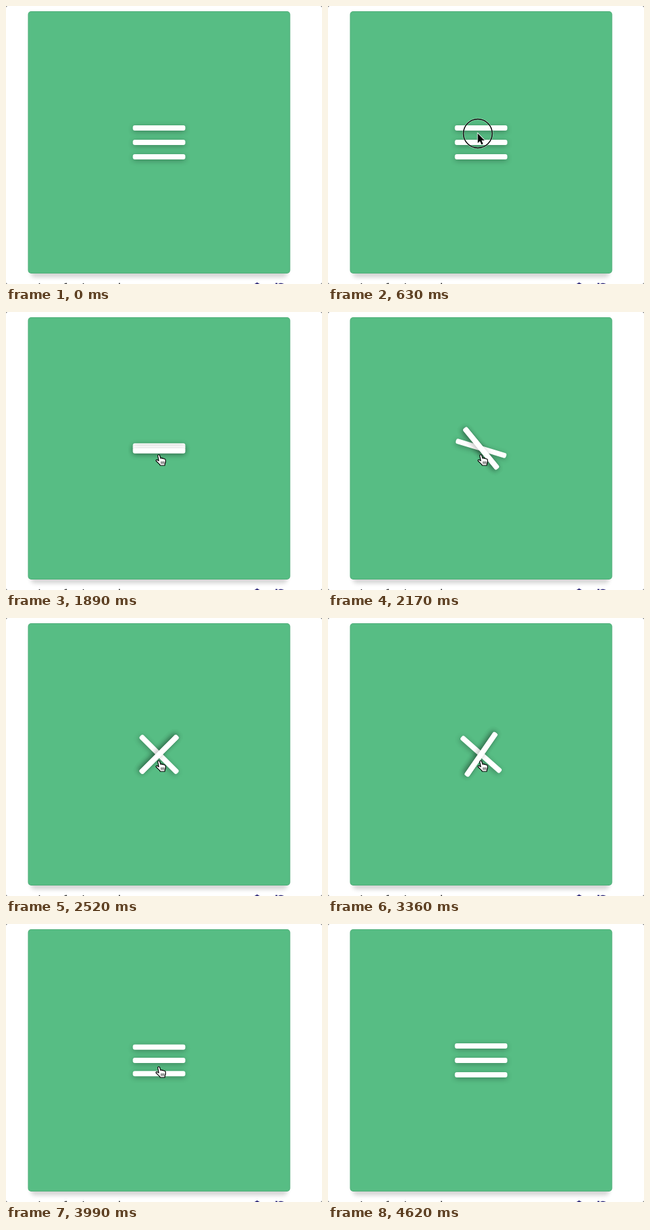
Animation, 482 px wide and 424 px high, one loop 5390 ms. Source, as an HTML page:

```html
<!DOCTYPE html>
<html lang="en">
<head>
<meta charset="utf-8">
<title>Menu icon</title>
<style>
  html, body { margin: 0; width: 100%; height: 100%; overflow: hidden; background: #fff; }
  svg { display: block; width: 100%; height: 100%; }
</style>
</head>
<body>
<svg viewBox="0 0 482 424">
  <defs>
    <filter id="soft" filterUnits="userSpaceOnUse" x="-70" y="-40" width="140" height="80">
      <feGaussianBlur stdDeviation="4"/>
    </filter>
    <filter id="lift" filterUnits="userSpaceOnUse" x="0" y="0" width="482" height="440">
      <feGaussianBlur stdDeviation="3"/>
    </filter>
    <g id="bar">
      <rect x="-40" y="-2" width="80" height="8" rx="3" opacity=".3" filter="url(#soft)"/>
      <rect x="-40" y="-4" width="80" height="8" rx="3" fill="#fff"/>
    </g>
  </defs>

  <rect width="482" height="424" fill="#fff"/>
  <path d="M0 0h2L0 2zM482 0v2l-2-2zM0 424v-2l2 2zM482 424h-2l2-2z" fill="#777"/>
  <g fill="#444">
    <path d="M50 423h2v1h-2zM89 423.5q1-1.5 4-1v1.500h-4zM117 423h2v1h-2zM172 422.500h2v1.500h-2z"/>
    <path d="M379 424l4-2.500 4 2.500zM411 422.500h3v1.500h-3zM415 424q4-3 9 0z" fill="#35307e"/>
  </g>

  <rect x="38" y="20" width="391" height="394" rx="6" opacity=".16" filter="url(#lift)"/>
  <rect x="33.500" y="8" width="400" height="400" rx="5" fill="#57bd84"/>
  <rect x="34" y="8.500" width="399" height="399" rx="4.500" fill="none" stroke="#000" stroke-opacity=".08"/>

  <use id="top" href="#bar"/>
  <use id="mid" href="#bar"/>
  <use id="low" href="#bar"/>

  <g id="ring" fill="none">
    <circle stroke="#fff" stroke-opacity=".55" stroke-width="2.600"/>
    <circle stroke="#000" stroke-width="1.500"/>
  </g>

  <g id="cursor">
    <path id="arrow" d="M0 0V14.500L3.300 11.400 5.600 16.800 8 15.800 5.700 10.500H10.300Z"
      fill="#000" stroke="#fff" stroke-width="1.600" paint-order="stroke"/>
    <g id="hand" transform="translate(-5.500 -.5)" stroke="#000" stroke-linejoin="round">
      <path d="M3.500 2C3.500 .6 5.800 .2 6.500 1.800L8 6.200C8.600 5.400 10 5.500 10.500 6.500 11.300 5.800 12.700 6.200 13 7.200
        14 6.700 15.200 7.300 15.400 8.400 15.800 10.500 15.500 12.500 14.500 14.500L14.200 17H7.200L6.500 15.500
        C4.500 14 3 12 1 10.300 .2 9 1.500 8 2.800 8.600L5 10Z" fill="#fff" stroke-width="1.200"/>
      <path d="M8.800 10.800v4M10.800 10.800v4M12.800 10.800v4" fill="none" stroke-width=".8"/>
    </g>
  </g>
</svg>

<script>
const LOOP = 5390, STEP = 70, TURN = 800;
const OPEN = 1676, SHUT = 3226;
const CX = 233.5, CY = 208, GAP = 22;

// time, x, y, exponent of the easing towards this point
const PATH = [
  [0, -159, 585, 1],
  [140, 228.5, 194.5, 1],
  [1190, 228.5, 194.5, 1],
  [1400, 233.5, 217.5, 1],
  [4270, 233.5, 217.5, 1],
  [4620, 36, 518, 2]
];

// start, end, first radius, final radius
const CLICKS = [
  [630, 840, 22, 23],
  [1680, 1820, 31, 31.5],
  [3080, 3290, 26, 31.5]
];

const $ = id => document.getElementById(id);
const [top_, mid, low, ring, cursor, arrow, hand] =
  ['top', 'mid', 'low', 'ring', 'cursor', 'arrow', 'hand'].map($);
const clamp = v => Math.min(1, Math.max(0, v));
const show = (el, on) => el.setAttribute('visibility', on ? 'visible' : 'hidden');
const bezier = (a, b, s) => 3 * a * s * (1 - s) ** 2 + 3 * b * s * s * (1 - s) + s ** 3;

// CSS "ease": cubic-bezier(.25, .1, .25, 1)
function ease(x) {
  if (x <= 0 || x >= 1) return clamp(x);
  let lo = 0, hi = 1;
  for (let i = 0; i < 24; i++) {
    const s = (lo + hi) / 2;
    if (bezier(.25, .25, s) < x) lo = s; else hi = s;
  }
  return bezier(.1, 1, lo);
}

function place(el, dy, angle) {
  el.setAttribute('transform', `translate(${CX} ${CY + dy}) rotate(${angle})`);
}

function drawBars(t) {
  const p = t < SHUT ? clamp((t - OPEN) / TURN) : 1 - clamp((t - SHUT) / TURN);
  const gap = GAP * (1 - ease(p * 2));
  const spin = ease(p * 2 - 1);
  place(top_, -gap, 135 * spin);
  place(mid, 0, 45 * spin);
  place(low, gap, 135 * spin);
}

function pointAt(t) {
  const i = PATH.findIndex(k => k[0] > t);
  if (i < 0) return PATH[PATH.length - 1].slice(1, 3);
  const [t0, x0, y0] = PATH[i - 1], [t1, x1, y1, power] = PATH[i];
  const u = ((t - t0) / (t1 - t0)) ** power;
  return [x0 + (x1 - x0) * u, y0 + (y1 - y0) * u];
}

function drawPointer(t) {
  const [x, y] = pointAt(t);
  const move = `translate(${x} ${y})`;
  const pointing = t >= 1330 && t < 4410;
  cursor.setAttribute('transform', move);
  show(arrow, !pointing);
  show(hand, pointing);

  const click = CLICKS.find(([from, to]) => t >= from && t < to);
  show(ring, click);
  if (!click) return;
  const [from, , r0, r1] = click;
  const r = r0 + (r1 - r0) * clamp((t - from) / STEP);
  ring.setAttribute('transform', move);
  for (const c of ring.children) c.setAttribute('r', r);
}

function render(ms) {
  const t = Math.floor(ms % LOOP / STEP) * STEP;
  drawBars(t);
  drawPointer(t);
}

const start = performance.now();
function tick() {
  render(performance.now() - start);
  requestAnimationFrame(tick);
}
tick();
</script>
</body>
</html>
```
